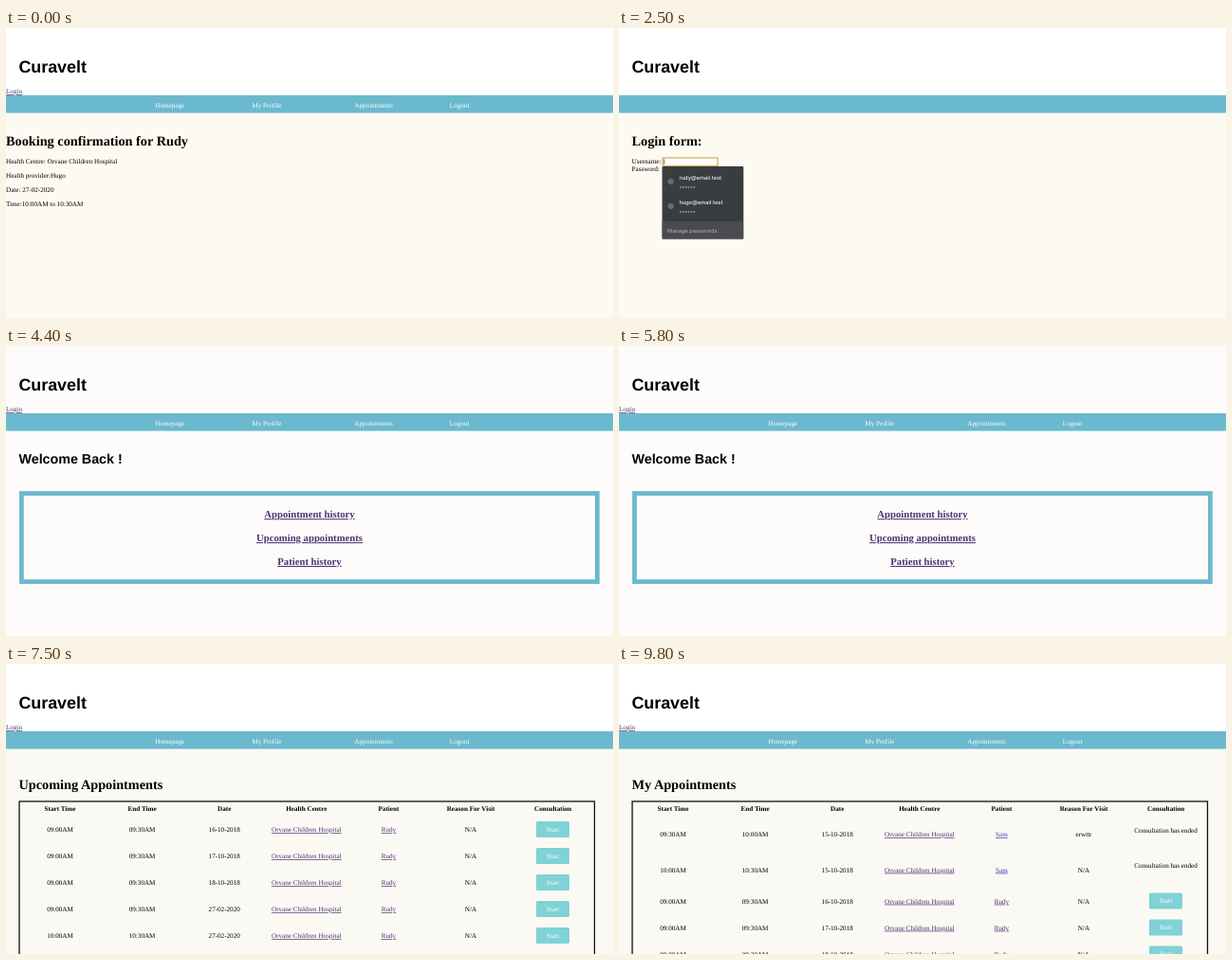
Write an HTML page that moves like this. It is 640x306 px and loops after 9900 ms.

```html
<!DOCTYPE html>
<html lang="en">
<head>
<meta charset="utf-8">
<title>Appointment booking demo</title>
<style>
  html, body { margin: 0; width: 100%; height: 100%; overflow: hidden; background: #fff; }
  svg { display: block; width: 640px; height: 306px; }
  text { font: 7.13px "Liberation Serif", "Times New Roman", serif; text-rendering: geometricPrecision; white-space: pre; }
  .brand { font: bold 17.84px "Liberation Sans", Arial, sans-serif; }
  .h1 { font-size: 14.27px; font-weight: bold; }
  .sans { font-family: "Liberation Sans", Arial, sans-serif; }
  .th { font-weight: bold; }
  .mid { text-anchor: middle; }
  .link { fill: #4d3470; text-decoration: underline; }
  .new { fill: #3a3aa8; }
  .big { font-size: 10.7px; font-weight: bold; }
  .white { fill: #fff; }
  .input { font: 5.2px "Liberation Sans", Arial, sans-serif; fill: #26282e; }
  .menu { font: 500 5.7px Inter, Roboto, sans-serif; fill: #f1f2f3; }
  .dim { fill: #b4b6b9; font-weight: 400; }
</style>
</head>
<body>
<svg id="stage" viewBox="0 0 640 306"></svg>
<script>
const LOOP = 9900, BLUE = "#6bb9ce";
const PATIENT = "Rudy", DOCTOR = "Hugo", OTHER = "Sam";
const CENTRE = "Orvane Children Hospital";
const PATIENT_MAIL = "rudy@email.test", DOCTOR_MAIL = "hugo@email.test";

const text = (x, y, s, cls = "") => `<text x="${x}" y="${y}" class="${cls}">${s}</text>`;
const rect = (x, y, w, h, fill, more = "") =>
  `<rect x="${x}" y="${y}" width="${w}" height="${h}" fill="${fill}" ${more}/>`;
const layer = (id, ...parts) => `<g id="${id}" visibility="hidden">${parts.join("")}</g>`;

// Shared page parts
const page = (top, body) => rect(0, 0, 640, 71, top) + rect(0, 71, 640, 235, body) +
  rect(0, 71, 640, 18.6, BLUE) + text(13.5, 47, "Curavelt", "brand");
const nav = text(0, 69.2, "Login", "link") +
  [["Homepage", 157.3], ["My Profile", 259.3], ["Appointments", 367.3], ["Logout", 467.8]]
    .map(([s, x]) => text(x, 83.8, s, "white")).join("");

// Appointment tables
const column = i => 57 + i * 86.6;
const heads = ["Start Time", "End Time", "Date", "Health Centre", "Patient", "Reason For Visit", "Consultation"];
const startButton = y => rect(559, y - 8.6, 35, 17, "#7fd2d5", 'rx="1.6"') + text(576.5, y + 2.2, "Start", "mid white");

function row([y, from, to, date, patient, reason = "N/A", ended]) {
  const cells = [from, to, date, CENTRE, patient, reason];
  const styles = { 3: "link", 4: patient === OTHER ? "link new" : "link" };
  return cells.map((s, i) => text(column(i), y + 2.4, s, "mid " + (styles[i] || ""))).join("") +
    (ended ? text(column(6), y - 1.8, "Consultation has ended", "mid") : startButton(y));
}

const table = (title, rows) => page("#fff", "#fbf9f4") + nav + text(13.5, 132, title, "h1") +
  rect(14, 145, 606.5, 180, "none", 'stroke="#111" stroke-width="1.3"') +
  heads.map((s, i) => text(column(i), 155.4, s, "mid th")).join("") + rows.map(row).join("");

const nine = ["09:00AM", "09:30AM"], ten = ["10:00AM", "10:30AM"];
const upcoming = [
  [174.6, ...nine, "16-10-2018", PATIENT],
  [202.6, ...nine, "17-10-2018", PATIENT],
  [230.6, ...nine, "18-10-2018", PATIENT],
  [258.6, ...nine, "27-02-2020", PATIENT],
  [286.6, ...ten, "27-02-2020", PATIENT]
];
const mine = [
  [179.6, "09:30AM", "10:00AM", "15-10-2018", OTHER, "erwttr", true],
  [217.2, ...ten, "15-10-2018", OTHER, "N/A", true],
  [250.2, ...nine, "16-10-2018", PATIENT],
  [278.2, ...nine, "17-10-2018", PATIENT],
  [306.2, ...nine, "18-10-2018", PATIENT]
];

// Login form parts
const value = s => text(47, 143, s, "input");
const field = (fill, stroke, width) =>
  rect(46, 137, 58, 8.4, fill, `stroke="${stroke}" stroke-width="${width}"`);
const caret = x => rect(x, 138.3, 0.6, 5.6, "#222");
const button = (fill, color) => rect(107.5, 146, 19, 7.4, fill, 'rx="1" stroke="#c4c4c4" stroke-width=".6"') +
  `<text x="117" y="151.6" class="input mid" style="fill:${color}">Login</text>`;

const entry = (y, mail) =>
  `<circle cx="54.6" cy="${y + 4.5}" r="2.7" fill="#5b5e62" stroke="#8c8f93" stroke-width=".6"/>` +
  `<path d="M52.8 ${y + 3.4}l2 1-.6 2" fill="none" stroke="#8c8f93" stroke-width=".7"/>` +
  text(63.5, y + 2.2, mail, "menu") + text(63.5, y + 13.2, "******", "menu dim");

function menu(mails, hover) {
  const foot = 152 + 26 * mails.length;
  return rect(45, 146, 87, foot - 126.8, "#000", 'opacity=".15" rx="1.5"') +
    rect(45.6, 146, 85.5, foot - 127.5, "#3a3d40", 'rx="1"') +
    (hover ? rect(45.6, 149, 85.5, 26, "#505357") : "") +
    rect(45.6, foot, 85.5, 18.5, "#494b4e") +
    mails.map((m, i) => entry(157.4 + 26 * i, m)).join("") +
    text(51, foot + 12.2, "Manage passwords...", "menu dim");
}

document.getElementById("stage").innerHTML = [
  layer("booking", page("#fff", "#fdfaf2"), nav,
    text(0, 123.8, `Booking confirmation for ${PATIENT}`, "h1"),
    ...[`Health Centre: ${CENTRE}`, `Health provider:${DOCTOR}`, "Date: 27-02-2020", "Time:10:00AM to 10:30AM"]
      .map((s, i) => text(0, 142.9 + 15 * i, s))),
  layer("login", page("#fff", "#fdfaf2"), text(13.5, 123.8, "Login form:", "h1"),
    text(13.5, 143, "Username:"), text(13.5, 151.3, "Password:"),
    rect(47, 145.9, 58, 7.8, "#e8f0fb", 'stroke="#d5dce6" stroke-width=".5"'),
    ...[0, 1, 2, 3, 4, 5].map(i => `<circle cx="${49.3 + i * 2.4}" cy="149.9" r=".85" fill="#222"/>`),
    button("#fff", "#333")),
  layer("filled", field("#e8f0fb", "#d5dce6", 0.5)),
  layer("plain", field("#fff", "#cfcfcf", 0.5)),
  layer("focusFilled", field("#e8f0fb", "#dcb062", 1.3)),
  layer("focus", field("#fff", "#dcb062", 1.3)),
  layer("marked", rect(46.8, 138, 38.4, 6.4, "#b3d4fc")),
  layer("patient", value(PATIENT_MAIL)),
  layer("letter", value("h"), caret(50.2)),
  layer("doctor", value(DOCTOR_MAIL)),
  layer("caretMid", caret(57)),
  layer("caretStart", caret(47)),
  layer("caretEnd", caret(86.4)),
  layer("bothMenu", menu([PATIENT_MAIL, DOCTOR_MAIL])),
  layer("oneMenu", menu([DOCTOR_MAIL])),
  layer("hoverMenu", menu([DOCTOR_MAIL], true)),
  layer("pressed", button("#d9e4f2", "#111")),
  layer("home", page("#fdfcfb", "#fdfcfb"), nav,
    `<text x="13.5" y="123.8" class="brand" style="font-size:14.27px">Welcome Back !</text>`,
    rect(16.4, 155.5, 607, 93.2, "none", `stroke="${BLUE}" stroke-width="4.8"`),
    ...["Appointment history", "Upcoming appointments", "Patient history"]
      .map((s, i) => text(320, 181.2 + 24.9 * i, s, "mid link big"))),
  layer("upcoming", table("Upcoming Appointments", upcoming)),
  layer("mine", table("My Appointments", mine))
].join("");

// Start time and the layers shown from then on
const steps = [
  [0, "booking"],
  [600, "login filled patient"],
  [1600, "login focusFilled patient caretMid bothMenu"],
  [2300, "login focusFilled marked patient bothMenu"],
  [2400, "login focus caretStart bothMenu"],
  [2600, "login focus letter oneMenu"],
  [3000, "login focus doctor hoverMenu"],
  [3400, "login focus doctor caretEnd"],
  [3600, "login plain doctor"],
  [3700, "login plain doctor pressed"],
  [3800, "login plain doctor"],
  [4000, "home"],
  [6700, "upcoming"],
  [8400, "mine"]
].map(([at, names]) => [at, new Set(names.split(" "))]);

const layers = [...document.querySelectorAll("#stage > g")];
const began = performance.now();
let shown;

function draw() {
  const t = (performance.now() - began) % LOOP;
  const step = steps.findLast(([at]) => at <= t);
  if (step !== shown) {
    shown = step;
    for (const g of layers) g.setAttribute("visibility", step[1].has(g.id) ? "visible" : "hidden");
  }
  requestAnimationFrame(draw);
}
draw();
</script>
</body>
</html>
```
